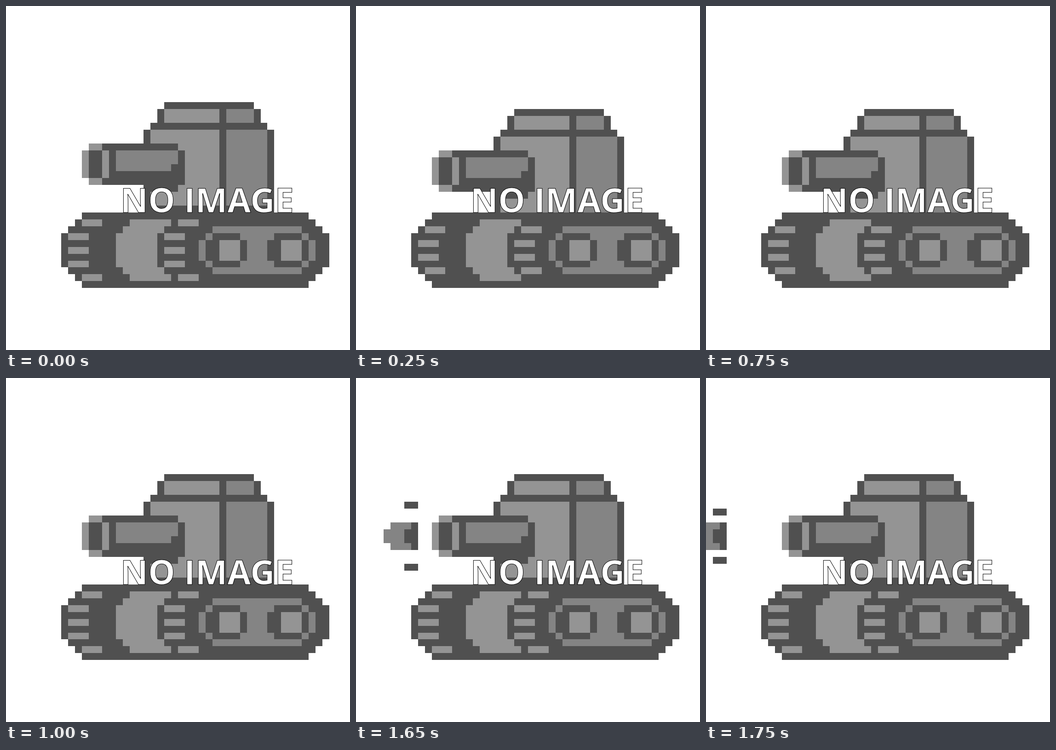
An HTML page with a canvas that plays this animation: 748x748 px, repeating every 1800 ms.

```html
<!DOCTYPE html>
<html lang="en">
<head>
<meta charset="utf-8">
<title>No image</title>
<style>
  html, body { margin: 0; width: 100%; height: 100%; overflow: hidden; background: #fff; }
  canvas { display: block; }
</style>
</head>
<body>
<canvas id="stage" width="748" height="748"></canvas>
<script>
const ctx = document.getElementById('stage').getContext('2d');
const CELL = 748 / 50, LOOP = 1800;
const DARK = '#505050', MID = '#848484', LIGHT = '#949494';
const snap = n => Math.round(n * CELL);

// Fill grid columns x0..x1 and rows y0..y1 (end exclusive).
function box(color, x0, y0, x1, y1) {
  const x = snap(x0), y = snap(y0);
  ctx.fillStyle = color;
  ctx.fillRect(x, y, snap(x1) - x, snap(y1) - y);
}

function wheel(x) {
  box(DARK, x + 1, 33, x + 5, 38);
  box(DARK, x, 34, x + 6, 37);
  box(LIGHT, x + 2, 34, x + 5, 37);
}

function treads(x, step) {
  for (let i = 0; i < 5 - step; i++) {
    const row = 31 + step + 2 * i;
    const inset = Math.max(0, Math.abs(row - 35) - 2);
    box(LIGHT, x + inset, row, x + inset + 3, row + 1);
  }
}

function hull(step) {
  for (let i = 0; i < 4; i++) box(DARK, 11 - i, 30 + i, 44 + i, 41 - i);
  for (let row = 31; row < 40; row++) {
    const inset = Math.max(0, Math.abs(row - 35) - 2);
    box(LIGHT, 16 + inset, row, 22 + inset, row + 1);
  }
  treads(9, step);
  treads(23, step);
  box(MID, 30, 32, 43, 39);
  box(MID, 29, 33, 44, 38);
  box(MID, 28, 34, 45, 37);
  wheel(29);
  wheel(38);
}

function turret(y) {
  box(DARK, 23, 14 + y, 36, 15 + y);
  box(DARK, 22, 15 + y, 37, 17 + y);
  box(DARK, 21, 17 + y, 38, 18 + y);
  box(DARK, 20, 18 + y, 39, 30 + y);
  box(LIGHT, 23, 15 + y, 31, 17 + y);
  box(MID, 32, 15 + y, 36, 17 + y);
  box(LIGHT, 21, 18 + y, 31, 29 + y);
  box(MID, 32, 18 + y, 38, 29 + y);
}

function barrel(y, recoil) {
  const x = 11 + recoil;
  box(DARK, x + 3, 20 + y, 25, 26 + y);
  box(DARK, 25, 21 + y, 26, 26 + y);
  box(DARK, 20, 26 + y, 25, 27 + y);
  box(LIGHT, x + 1, 20 + y, x + 3, 26 + y);
  box(LIGHT, x, 21 + y, x + 4, 25 + y);
  box(DARK, x + 1, 21 + y, x + 3, 25 + y);
  box(MID, x + 5, 21 + y, 25, 23 + y);
  box(MID, x + 5, 23 + y, 24, 24 + y);
  if (recoil) box(MID, x + 2, 22 + y, x + 3, 24 + y);
}

function shell(right, spread) {
  box(DARK, right - 2, 20 - spread, right, 21 - spread);
  box(DARK, right - 2, 25 + spread, right, 26 + spread);
  box(MID, right - 4, 21, right - 1, 25);
  box(MID, right - 5, 22, right - 4, 24);
  box(DARK, right - 1, 21, right, 25);
  box(DARK, right - 2, 22, right - 1, 24);
}

function label() {
  ctx.font = 'bold 74px "Open Sans", sans-serif';
  ctx.lineWidth = 1;
  ctx.fillStyle = '#fff';
  ctx.strokeStyle = '#000';
  ctx.fillText('NO IMAGE', 248.8, 448.5);
  ctx.strokeText('NO IMAGE', 248.8, 448.5);
}

function draw(t) {
  const bob = t < 1000 ? Math.floor(t / 250) % 2 : 0;
  const recoil = t >= 1500 && t < 1600 ? 3 : 0;
  box('#fff', 0, 0, 50, 50);
  turret(bob);
  hull(bob);
  if (t >= 1600) {
    const step = Math.floor((t - 1600) / 50);
    shell(12 - 3 * step, step < 2 ? 2 : 1);
  }
  barrel(bob, recoil);
  label();
}

function tick() {
  draw(performance.now() % LOOP);
  requestAnimationFrame(tick);
}
tick();
</script>
</body>
</html>
```
